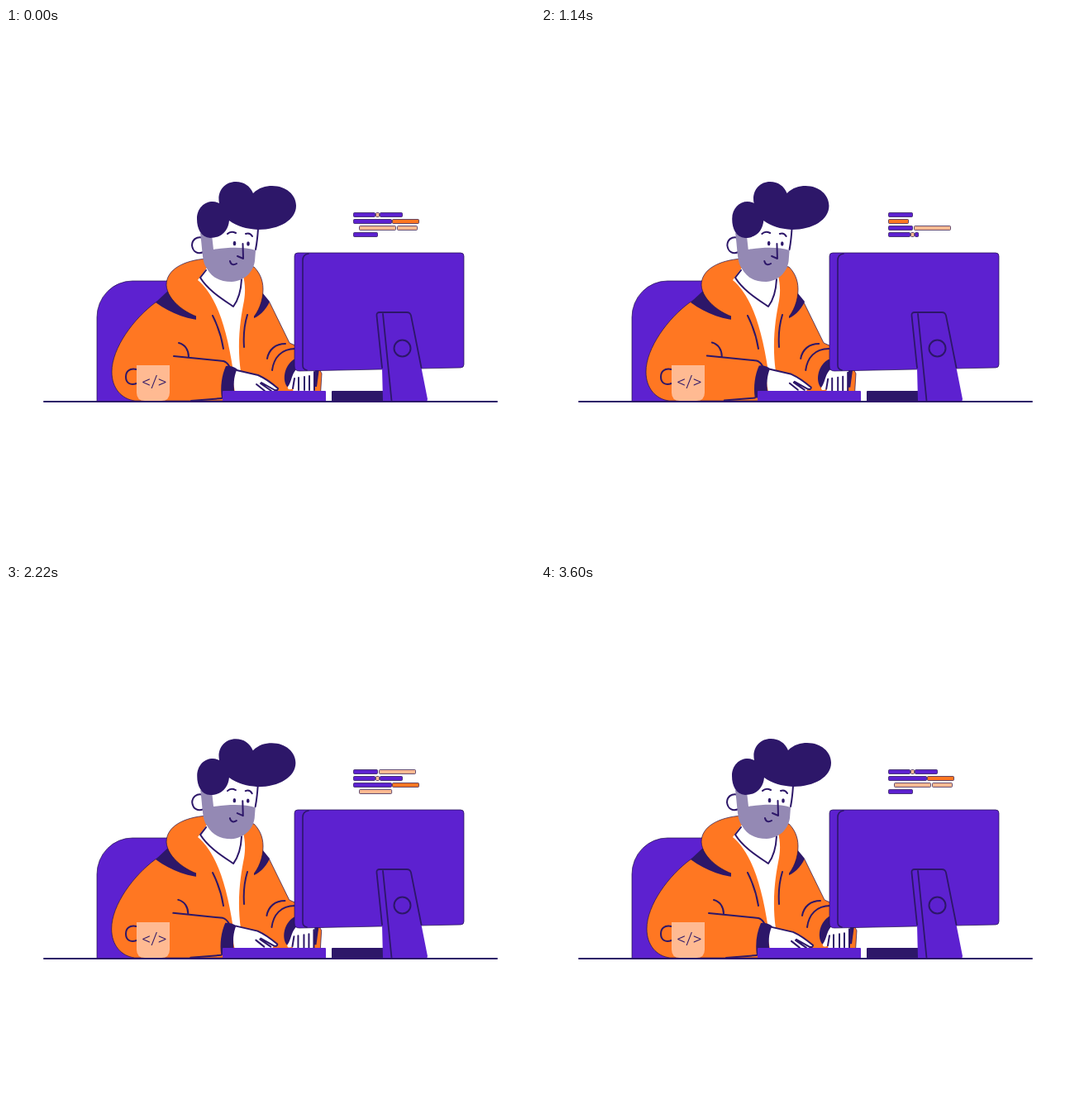
These frames come from a looping animation (640x640 px, 3.63 s). An HTML page:

```html
<!DOCTYPE html>
<html lang="en">
<head>
<meta charset="utf-8">
<title>Coder at work</title>
<style>
  html, body { margin: 0; width: 100%; height: 100%; overflow: hidden; background: #fff; }
  svg { display: block; width: 100vw; height: 100vh; }
  .purple { fill: #5d21d0; }
  .dark { fill: #2d1769; }
  .orange { fill: #ff7722; }
  .peach { fill: #ffba92; }
  .white { fill: #fff; }
  .beard { fill: #9489b4; }
  .line { fill: none; }
  .line, .ink { stroke: #2d1769; stroke-width: 2; stroke-linecap: round; stroke-linejoin: round; }
  .edge { stroke: #21104d; stroke-width: .7; }
  text { font: 300 21px Roboto, sans-serif; text-anchor: middle; }
</style>
</head>
<body>
<svg viewBox="0 0 640 640">
  <path class="purple edge" d="M110 452V350A43 44 0 0 1 153 306H230V452Z"/>

  <g id="body">
    <path class="orange edge" d="M181 332C155 351 128 387 128 416C128 436 140 449 156 451H380L382 418Q368 390 352 385L343 381L319 332L300 315H210Z"/>
  </g>

  <g id="hood">
    <path class="dark" d="M197 317L181 332C200 346 222 354 245 354L230 335Z"/>
    <path class="dark" d="M310 320L319 331C314 342 306 349 296 353L300 335Z"/>
    <path class="orange edge" d="M243 279C215 281 194 292 194 311C195 330 220 349 245 353H297C306 343 311 330 311 316C311 304 306 295 300 289Z"/>
    <path class="orange" d="M230 345H300V356H230Z"/>
    <path class="white" d="M243 290L232 305C252 322 266 355 275 416H284C279 380 284 350 288 330C290 318 289 308 287 300Z"/>
    <path class="line" d="M242 293L235 302C245 318 262 328 275 337Q284 325 285 304"/>
    <path class="line" d="M250 348C257 362 261 375 263 388M292 347C288 360 287 372 288 386"/>
  </g>

  <g id="head">
    <path class="white ink" d="M239 254C230 251 225 257 225 263C226 271 232 274 239 271"/>
    <path class="white" d="M236 240L305 238L302 271H238Z"/>
    <path class="beard" d="M235 248C238 270 237 283 243 291C250 303 260 307 273 307C288 306 299 296 301 282L302 269C290 265 270 265 251 268L249 250Z"/>
    <path class="line" d="M305 243Q304 258 302 268M286.5 261L287 279L280 276M271 282C272 287 276 287 279 285M268 249Q272 245 278 248M290 249Q295 247 298 252"/>
    <g class="dark" id="eyes">
      <ellipse cx="276.5" cy="260.5" rx="1.8" ry="2.7"/>
      <ellipse cx="293" cy="261" rx="1.8" ry="2.7"/>
    </g>
    <path class="dark" d="M231 231C231 218 240 210 250 210Q254 210 258 212C255 198 264 186 278 186C288 186 295 191 299 200C306 193 314 191 322 191C339 191 351 202 351 215C351 232 331 244 305 244C290 243 280 240 270 233C269 244 262 254 247 254C236 253 231 243 231 231Z"/>
  </g>

  <g id="rightArm">
    <path class="line" d="M316 400C318 389 326 382 338 382M322 414C324 399 333 388 350 388"/>
    <g id="rightHand">
      <path class="dark" d="M350 400C338 406 333 424 340 434H376L379 412Z"/>
      <path class="white" d="M351 413C345 420 346 427 341 434C340 438 344 438 347 436L348 443H372L374 412Z"/>
      <path class="line" d="M347 436L349 424M354 438V423M361 438V422M367 438V421M373 438V416"/>
    </g>
  </g>

  <g id="leftArm">
    <path class="line" d="M209 381C217 383 221 390 221 398M203 397L263 403Q267 404 270 409M224 451L261 448"/>
    <path class="dark" d="M266 409C261 420 259 434 261 448H278C274 434 276 424 280 413Q273 408 266 409Z"/>
    <g id="leftHand">
      <path class="white" d="M279 414L305 420C314 424 322 430 329 436Q329 439 325 438L321 443H278C274 432 276 422 279 414Z"/>
      <path class="line" d="M279 414L305 420C314 424 322 430 329 436Q329 439 325 438L309 429M308 430L321 439M303 431L313 439"/>
    </g>
  </g>

  <path class="line" d="M158 413C149 411 145 416 145 422C145 429 150 433 158 430"/>
  <path class="peach" d="M158 408H198V441Q198 451 188 451H168Q158 451 158 441Z"/>
  <text class="dark" x="179.5" y="434.5">&lt;/&gt;</text>

  <rect class="purple" x="262" y="439" width="125" height="13" rx="1"/>
  <rect class="dark" x="394" y="439" width="66" height="13" rx="1"/>
  <path class="purple edge" d="M353 272H550Q554 272 554 276V407Q554 411 550 411L355 415Q349 415 349 409V276Q349 272 353 272Z"/>
  <path class="line" d="M366 273Q359 274 359 281V408Q359 413 364 414" style="stroke-width:1.6"/>
  <path class="purple" d="M448 348Q448 344 452 344H485Q489 344 490 348L510 449Q510 452 507 452H456L455 411Z"/>
  <path class="line" d="M455 411L448.500 348Q448 344 452 344H485Q489 344 490 348L502.500 411M456 346L466.500 451" style="stroke-width:1.8"/>
  <circle class="line" cx="479.500" cy="387.500" r="10"/>
  <path class="line" d="M46 452H594"/>

  <g id="code" class="edge"></g>
</svg>
<script>
const LOOP = 3630;
const el = id => document.getElementById(id);
const move = (id, x, y) => el(id).setAttribute('transform', `translate(${x} ${y})`);

// Each line: left edge, gap between bars, then [width, colour] bars.
const lines = [
  [420, 1, [26, 'purple'], [4, 'peach'], [27, 'purple']],
  [420, 1, [46, 'purple'], [32, 'orange']],
  [427, 2, [44, 'peach'], [24, 'peach']],
  [420, 2, [29, 'purple']],
  [420, 2, [24, 'orange']],
  [420, 2, [29, 'purple'], [44, 'peach']]
];
const lineWidth = ([, gap, ...bars]) => bars.reduce((sum, [w]) => sum + w + gap, -gap);

// Typed pixels over time.
const pace = [[0, 0], [45, 0], [300, 43], [1140, 135], [1830, 226], [2610, 326], [2690, 336], [LOOP, 336]];

function typedAt(t) {
  const i = pace.findIndex(([time]) => time > t);
  const [t0, p0] = pace[i - 1], [t1, p1] = pace[i];
  return p0 + (p1 - p0) * (t - t0) / (t1 - t0);
}

function ease(t, from, to) {
  const k = Math.min(1, Math.max(0, (t - from) / (to - from)));
  return k * k * (3 - 2 * k);
}
const pulse = (t, a, b, c, d) => ease(t, a, b) - ease(t, c, d);

function drawLine([x, gap, ...bars], y, visible) {
  let svg = '';
  for (const [w, colour] of bars) {
    const shown = Math.min(w, visible);
    if (shown > 0) svg += `<rect class="${colour}" x="${x + 0.5}" y="${y}" width="${shown}" height="5" rx="1"/>`;
    x += w + gap;
    visible -= w + gap;
  }
  return svg;
}

function drawCode(t) {
  let left = typedAt(t);
  const rows = lines.slice(0, 4).map(line => [line, Infinity]);
  for (let i = 4; left > 0.01 && i < 10; i++) {
    const line = lines[i % 6];
    rows.push([line, left]);
    left -= lineWidth(line);
  }
  el('code').innerHTML = rows.slice(-4)
    .map(([line, visible], i) => drawLine(line, 223.5 + i * 8, visible)).join('');
}

function render(t) {
  const nod = pulse(t, 2190, 2570, 2640, 3060);
  const blink = pulse(t, 2400, 2520, 2660, 2780);
  const sway = pulse(t, 560, 1100, 2000, 2350);
  const tap = phase => -0.8 * (1 - Math.cos(2 * Math.PI * (t / LOOP * 12 + phase)));

  el('head').setAttribute('transform',
    `rotate(${4 * nod} 176 351) translate(240 0) scale(${1 - 0.023 * sway} 1) translate(-240 0)`);
  el('eyes').setAttribute('transform', `translate(0 ${260.5 * blink * 0.85}) scale(1 ${1 - 0.85 * blink})`);
  move('hood', 2 * nod, 2 * nod);
  move('body', -sway, 0);
  move('leftArm', -2.2 * sway, -0.5 * sway);
  move('rightArm', -1.8 * sway, 0);
  move('leftHand', 0, tap(0));
  move('rightHand', 0, tap(0.5) + 1.6);
  drawCode(t);
}

function frame() {
  render(performance.now() % LOOP);
  requestAnimationFrame(frame);
}
frame();
</script>
</body>
</html>
```
